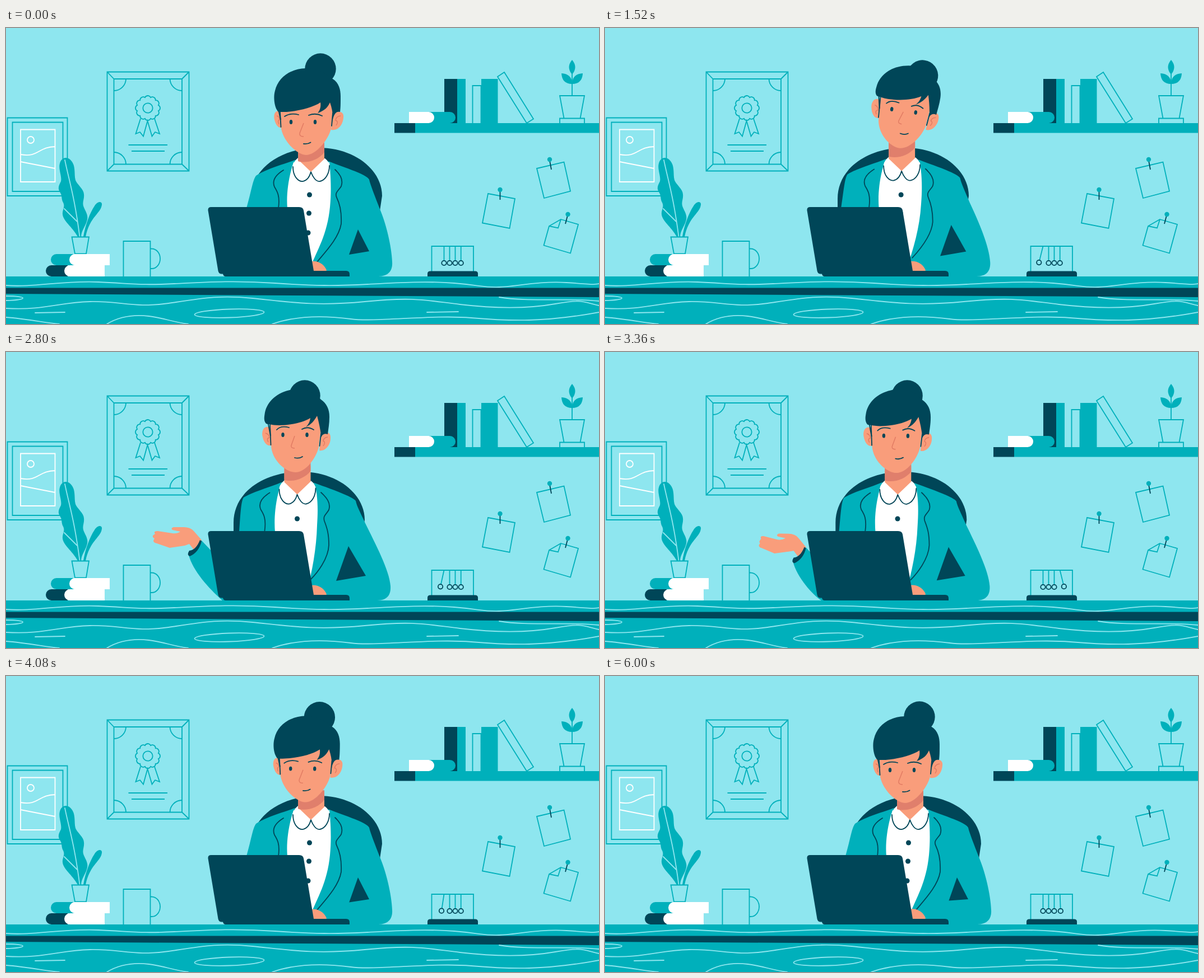
Write an HTML page that moves like this. It is 1058x529 px and loops after 6.08 s.

```html
<!DOCTYPE html>
<html lang="en">
<head>
<meta charset="utf-8">
<title>At the desk</title>
<style>
html, body { margin: 0; width: 100%; height: 100%; overflow: hidden; background: #8ee6ef; }
svg { display: block; width: 100vw; height: 100vh; }
.t { fill: #00b0bb; }
.d { fill: #004658; }
.w { fill: #fff; }
.s { fill: #f99d7b; }
.lt, .lw, .ld, .ll, .ls { fill: none; stroke-width: 1.8; }
.lt { stroke: #00b0bb; }
.lw { stroke: #fff; }
.ld { stroke: #004658; }
.ll { stroke: #8ee6ef; stroke-linecap: round; }
.ls { stroke: #e07a62; stroke-width: 1.4; }
.pot { fill: #8ee6ef; }
#face .ld, #torso .ld, #lapel { stroke-linecap: round; }
</style>
</head>
<body>
<svg viewBox="0 0 1058 529">
  <rect width="1058" height="529" fill="#8ee6ef"/>

  <!-- certificate -->
  <g class="lt">
    <path d="M180.5 78.5H326.5V255.5H180.5ZM192.5 91H314V243.5H192.5ZM180.5 78.5L192.5 91M326.5 78.5L314 91M326.5 255.5L314 243.5M180.5 255.5L192.5 243.5"/>
    <path d="M214 91A21.5 21.5 0 0 1 192.5 112M292.5 91A21.5 21.5 0 0 0 314 112M314 222A21.5 21.5 0 0 0 292.5 243.5M192.5 222A21.5 21.5 0 0 1 214 243.5"/>
    <path id="rosette"/>
    <circle cx="253" cy="143" r="8.7"/>
    <path d="M240 162L231.5 189L239 186L245 193.5L252.5 166L260.5 193.5L266 186L274 189L265 162M218.5 209H288M224 220H283"/>
  </g>

  <!-- landscape -->
  <path class="lt" d="M2.5 160.5H109.5V300H2.5ZM11.5 168.5H101.5V292H11.5Z"/>
  <g class="lw">
    <path d="M26 181.5H87.5V275H26ZM26 226C58 232 58 212 87.5 212M26 239L87.5 251"/>
    <circle cx="44" cy="200" r="6"/>
  </g>

  <!-- plant, books, mug -->
  <path class="t" d="M128 373C118 355 102 345 101 333C100 325 106 320 102 312C98 305 101 300 96 293C92 286 94 282 98 274C100 265 93 252 96 242C99 230 111 229 117 238C125 248 121 262 124 272C127 280 139 288 139 297C140 306 136 310 138 318C140 325 147 333 145 342C143 353 134 362 134 373ZM138 373C142 350 150 330 158 318C163 309 172 309 171 316C169 332 150 336 142 373Z"/>
  <path class="ll" d="M105 236C113 275 122 300 131.5 373M104 323L127 346"/>
  <path class="lt pot" d="M117.5 373.5H148L143 403.5H123Z"/>
  <path class="t" d="M120 404H90A10 10 0 0 0 90 424H120Z"/>
  <path class="d" d="M110 424H81A10 10 0 0 0 81 444H110Z"/>
  <path class="w" d="M185 404H123A10 10 0 0 0 123 424H185ZM176 424H114A10 10 0 0 0 114 444H176Z"/>
  <path class="lt" d="M209.5 444V381H257.5V444M257.5 394.5h2.5a15 17.7 0 0 1 0 35.5h-2.5"/>

  <!-- shelf -->
  <path class="t" d="M730 170H1058V187.5H730ZM805 91H820V170H805ZM848 91H877.5V170H848Z"/>
  <path class="d" d="M693 170H730V187.5H693ZM782 91H805V170H782Z"/>
  <path class="t" d="M755 150H792A10 10 0 0 1 792 170H755Z"/>
  <path class="w" d="M719 150H754A10 10 0 0 1 754 170H719Z"/>
  <path class="lt" d="M832.5 170V103H847.5V170M877 87L889 79L941 162.5L929 170ZM988 121H1032L1024.5 161.5H995.5ZM988 170V161.5H1032V170M1010 121V80"/>
  <path class="t" d="M1010 57Q1021 70 1010 83Q999 70 1010 57ZM1010 100Q992 100 991 81Q1010 82 1010 100ZM1010 100Q1010 82 1029 81Q1028 100 1010 100Z"/>

  <!-- pinned notes -->
  <path class="lt" d="M947 251L995.5 239.5L1007 291.5L960 304ZM860 296L908 305L898.5 358L850 348.5ZM990 342L1021 351L1007 402.5L959.5 388.5L969 354ZL985 357.5L969 354"/>
  <path class="ld" d="M970 237L973 253M881.5 291V307M1002 335L998 350"/>
  <g class="t"><circle cx="970" cy="235" r="4.2"/><circle cx="881.5" cy="289" r="4.2"/><circle cx="1002.5" cy="333" r="4.2"/></g>

  <!-- cradle -->
  <path class="lt" d="M759.5 436V390H834V436"/>
  <path class="d" d="M752 444V439Q752 434.5 757 434.5H837Q842 434.5 842 439V444Z"/>
  <g id="cradle"></g>

  <!-- person -->
  <path id="chair" class="d" d="M437 444V305C437 250 492 214 557 214C624 214 671 255 671 300L665 340V444Z"/>
  <path id="sleeve" class="t"/>
  <path id="hand" class="s"/>
  <path id="cuff" class="d" d="M5 -10Q-2 8 -14 9Q-19 17 -13 19Q3 12 8 -8Z"/>
  <path id="jacket" class="t"/>
  <path id="gap" class="d"/>
  <path id="shirt" class="w"/>
  <path id="lapel" class="ld"/>
  <g id="buttons" class="d"><circle cx="541.5" cy="298" r="4.5"/><circle cx="540.5" cy="331" r="4.5"/><circle cx="539" cy="366" r="4.5"/></g>
  <g id="torso">
    <path class="ld" d="M495 254C482 262 474 272 479 284C484 292 489 300 486 322"/>
    <path class="w" d="M521 232C514 238 512 243 512 248C512 266 522 275 530 274C538 272 542 265 544 257C547 266 553 275 560 274C570 272 577 260 577 246C576 240 573 236 569 233Z"/>
    <path class="ld" d="M512 248C512 266 522 275 530 274C538 272 542 265 544 257C547 266 553 275 560 274C570 272 577 260 577 246"/>
    <path class="s" d="M521 205V235L544 257L568 234V205Z"/>
    <path id="shade" fill="#e07f6c" d="M521 205V238C535 243 558 236 568 222V205Z"/>
  </g>
  <g id="head">
    <g id="ears"><path class="s"/><path class="s"/><path class="ls"/></g>
    <circle id="bun" class="d" r="27.7"/>
    <g id="face">
      <path class="s"/><path class="d"/><path class="ld"/><path class="ld"/><path class="ls"/><path class="ld"/>
    </g>
    <ellipse class="d eye" rx="2.7"/><ellipse class="d eye" rx="2.7"/>
  </g>

  <path id="typing" class="s" d="M540 418C555 414 565 421 570 429Q573 433 571 436H540Z"/>
  <path class="d" d="M366 320H523Q530 320 531 326L549 434H607Q613 434 613 440V444H392Q388 444 387 439.5H384Q379.5 439 378.5 434L360.5 326Q360 320 366 320Z"/>

  <!-- desk -->
  <rect class="t" y="444" width="1058" height="85"/>
  <path class="d" d="M0 464.5H1058V481L0 475Z"/>
  <path class="ll" d="M0 460C50 464 100 451 165 454S240 460 300 457S410 451 480 456S590 461 645 458S750 452 800 456S850 464 880 463S950 452 1000 455S1040 459 1058 457"/>
  <path class="ll" d="M0 479C40 479 40 486 0 487M0 501C70 505 95 490 150 489S230 501 290 492S380 477 440 483S550 498 640 489S750 487 810 494S930 502 980 493S1030 490 1058 496M880 481C930 490 1000 482 1058 488M0 517C40 520 70 527 95 529M180 529C205 514 230 512 255 515S300 526 325 529M475 529C520 513 570 514 615 520S760 512 830 518S960 526 1058 508M52 509L105 508M751 508L807 507"/>
  <ellipse class="ll" cx="398.5" cy="510" rx="62" ry="7.5" transform="rotate(-2 398.5 510)"/>
</svg>
<script>
const LOOP = 6080, STEP = 80, TAU = Math.PI * 2;
const $ = s => document.querySelector(s);
const set = (el, o) => { for (const k in o) el.setAttribute(k, o[k]); };
const mix = (a, b, u) => a + (b - a) * u;
const ease = u => { u = Math.min(1, Math.max(0, u)); return u * u * (3 - 2 * u); };
const ramp = (t, a, b) => ease((t - a) / (b - a));

// Blend two paths that share the same commands.
function morph([a, b], u) {
  const num = /-?\d+(\.\d+)?/g, to = b.match(num);
  let i = 0;
  return a.replace(num, v => mix(+v, +to[i++], u).toFixed(2));
}

// Keys are [time, ...values].
function track(keys, t) {
  if (t <= keys[0][0]) return keys[0].slice(1);
  for (let i = 1; i < keys.length; i++) {
    const a = keys[i - 1], b = keys[i];
    if (t < b[0]) return a.slice(1).map((v, j) => mix(v, b[j + 1], ramp(t, a[0], b[0])));
  }
  return keys[keys.length - 1].slice(1);
}

// x, y, tilt, looking down, bun x, bun y
const HEAD = [
  [640, 0, 0, 0, 1, 0, 0], [1520, 17.5, 0, 8, 0, 7, 3], [2160, 5, -1, 5, 0, -2, -2],
  [2720, 0, 0, 0, 0, 0, 0], [3200, 0, 0, 0, 0, 0, 0], [3600, 6, 0, 1, .25, 3, 1], [4240, 0, 0, 0, 1, 0, 0]
];
// wrist x, y, curl
const HAND = [
  [1600, 455, 442, 1], [1920, 396, 374, 1], [2160, 348, 340, 1],
  [2480, 341, 346, 0], [3240, 341, 346, 0], [3600, 378, 394, .75], [3840, 455, 442, 1]
];

// Flat palm against curled fingers, around the wrist.
const PALM = [
  'M8 -10L-6 -26Q-12 -33 -24 -33L-42 -33Q-48 -31 -44 -28L-30 -25Q-36 -21 -44 -22L-70 -26Q-79 -26 -75 -21L-79 -18Q-80 -14 -76 -13L-78 -9Q-78 -5 -72 -4L-49 4L-22 0L-14 -3L-4 10Z',
  'M8 -9L-4 -27Q-9 -35 -20 -36L-34 -38Q-39 -35 -34 -31L-22 -28Q-32 -25 -40 -28L-53 -43Q-59 -46 -60 -40L-56 -34Q-60 -36 -65 -33L-68 -30Q-69 -26 -65 -24L-45 -8L-20 -10L-14 -4L-4 10Z'
];

// Upright pose against leaning pose.
const JACKET = [
  'M516 236C490 245 460 254 446 264C440 272 437 295 429 322L420 444L664 444C684 444 690 432 689 418C688 390 678 350 668 326C658 300 650 280 648 271C645 262 600 248 575 238Z',
  'M491 233C470 242 440 250 424 260C419 266 418 295 416 322L405 444L662 444C682 444 687 432 686 418C684 390 660 345 640 304C632 286 626 276 624 266C618 258 575 243 550 234Z'
];
const SHIRT = [
  'M513 240C503 270 500 300 502 322L530 430L542 430C556 395 573 370 578 320C581 290 579 260 577 240Z',
  'M489 240C480 270 478 300 480 322L520 430L536 430C546 395 554 350 555 310C557 280 556 260 552 240Z'
];
const LAPEL = [
  'M587 253C597 262 602 272 598 283C593 291 586 294 590 303C596 315 599 330 598 350C594 375 570 400 555 418',
  'M562 251C572 260 580 270 576 282C572 290 565 292 568 302C573 315 576 325 576 345C575 370 555 395 544 406'
];

// Looking up against looking down.
const EARS = [
  ['M473 136C460 128 455 142 458 152C460 162 466 169 473 167Z', 'M490 149C479 145 477 156 479 164C481 172 485 179 491 178Z'],
  ['M562 150C568 140 580 142 579 154C579 167 569 178 559 176Z', 'M583 155C590 146 604 148 602 160C601 173 593 184 580 182Z'],
  ['M463 145Q470 147 470 154M470 153Q464 154 468 161M574 152Q566 153 566 160M566 159Q571 161 566 168',
   'M483 157Q488 158 488 164M488 164Q484 165 487 172M597 157Q588 158 588 166M588 165Q594 167 589 174']
];
const FACE = [
  ['M472 120L473 168C475 195 500 215 516 215C535 215 553 190 558 170L565 110Z',
   'M490 140L491 180C496 205 520 226 535 227C553 227 575 200 580 180L585 130Z'],
  ['M464 128C459 122 461 115 462 108C467 85 490 66 525 66C540 66 552 75 562 85C572 92 577 102 577 116C577 128 575 138 574 147C566 144 561 150 560 162L562 150C561 138 558 125 555 114C550 123 544 130 535 134C540 129 542 125 543 118C525 129 490 134 469 129L473 150L471 150L467 129Z',
   'M485 149C478 140 477 122 480 112C485 90 505 73 535 72C555 71 575 84 583 91C594 98 597 110 597 122C597 135 597 142 596 150C588 148 584 155 582 170L583 160C583 150 581 142 578 133C574 142 568 148 556 152C561 146 562 140 561 133C545 144 510 151 488 150L491 164L489 164L486 150Z'],
  ['M471 128L472.5 166M562 146L559.5 168', 'M489 150L490.5 177M583 152L581 175'],
  ['M483 139Q490 131 505 135M528 138Q538 132 549 139', 'M497 158Q508 151 522 155M540 156Q552 151 564 157'],
  ['M515 150L509 167Q508 172 515 172', 'M531 170L524 188Q523 194 531 194'],
  ['M515 189Q523 191 529 187', 'M531 207Q538 208 543.5 204.5']
];

const ears = [...$('#ears').children], face = [...$('#face').children], eyes = [...document.querySelectorAll('.eye')];
const NS = 'http://www.w3.org/2000/svg';
const make = (tag, o) => { const el = $('#cradle').appendChild(document.createElementNS(NS, tag)); set(el, o); return el; };
const balls = [781.5, 791.5, 801.5, 811.7].map(x => ({
  x,
  line: make('path', { class: 'lt' }),
  ring: make('circle', { class: 'ld', r: 4.2 })
}));

let lobes = '';
for (let i = 0; i <= 12; i++) {
  const a = (i + .5) / 12 * TAU, p = `${253 + 19.5 * Math.cos(a)} ${143 + 19.5 * Math.sin(a)}`;
  lobes += i ? `A5.6 5.6 0 0 1 ${p}` : `M${p}`;
}
set($('#rosette'), { d: lobes + 'Z' });

function drawCradle(t) {
  const p = t / 1216 % 1, s = Math.sin(p * TAU), back = p * 2 % 1 > .5;
  const swing = 7.2 * (back ? s * s : Math.abs(s));
  balls.forEach(({ x, line, ring }, i) => {
    const dx = i === 0 && s > 0 ? -swing : i === 3 && s < 0 ? swing : 0;
    const dy = Math.sqrt(900 - dx * dx), k = 25.6 / 30;
    set(line, { d: `M${x} 390L${x + dx * k} ${390 + dy * k}` });
    set(ring, { cx: x + dx, cy: 390 + dy });
  });
}

function drawBody(t, down) {
  const lean = ramp(t, 800, 2060) - ramp(t, 3200, 3960);
  const roll = ramp(t, 800, 1920) - ramp(t, 3160, 3920);
  const tap = (1 - Math.cos(t / LOOP * 24 * TAU)) / 2;
  set($('#chair'), { transform: `translate(${-31 * roll} 0)` });
  set($('#jacket'), { d: morph(JACKET, lean) });
  set($('#shirt'), { d: morph(SHIRT, lean) });
  set($('#lapel'), { d: morph(LAPEL, lean) });
  set($('#torso'), { transform: `translate(${-24.5 * lean} ${-2.5 * lean})` });
  set($('#buttons'), { transform: `translate(${-22 * lean} 0)` });
  set($('#shade'), { transform: `translate(0 ${-7 * (1 - down)})` });
  const still = 1 - lean;
  set($('#gap'), {
    d: `M${mix(628, 611, lean)} ${mix(360, 347, lean)}L${mix(612, 589, lean) + 2 * tap * still} ${mix(405, 409, lean) - 5 * tap * still}L${mix(648, 642, lean)} ${mix(399, 400, lean)}Z`
  });
  set($('#typing'), { transform: `translate(0 ${-.8 * tap})` });
}

function drawHand(t) {
  const [x, y, curl] = track(HAND, t), transform = `translate(${x} ${y})`;
  set($('#hand'), { transform, d: morph(PALM, curl) });
  set($('#cuff'), { transform });
  set($('#sleeve'), { d: `M${x - 15} ${y + 17}C${x - 8} ${y + 44} ${x + 20} ${y + 76} 386 444H440L${x + 45} ${y + 30}L${x + 7} ${y - 10}Z` });
}

function drawHead(t, [x, y, tilt, down, bx, by]) {
  const cx = mix(515.5, 530, down), cy = mix(148, 168, down);
  set($('#head'), { transform: `translate(${x} ${y}) rotate(${tilt} ${cx} ${cy})` });
  ears.forEach((el, i) => set(el, { d: morph(EARS[i], down) }));
  face.forEach((el, i) => set(el, { d: morph(FACE[i], down) }));
  set($('#bun'), { cx: mix(533, 561, down) + bx, cy: mix(78, 73, down) + by });
  const shut = Math.max(...[520, 4800].map(b => 1 - Math.abs(t - b) / 130), 0);
  eyes.forEach((el, i) => set(el, { cx: cx + (i ? 21.5 : -21.5), cy, ry: mix(3.9, .7, ease(shut)) }));
}

function draw(t) {
  const pose = track(HEAD, t);
  drawCradle(t);
  drawBody(t, pose[3]);
  drawHand(t);
  drawHead(t, pose);
}

function tick() {
  draw(Math.floor(performance.now() % LOOP / STEP) * STEP);
  requestAnimationFrame(tick);
}
tick();
</script>
</body>
</html>
```
